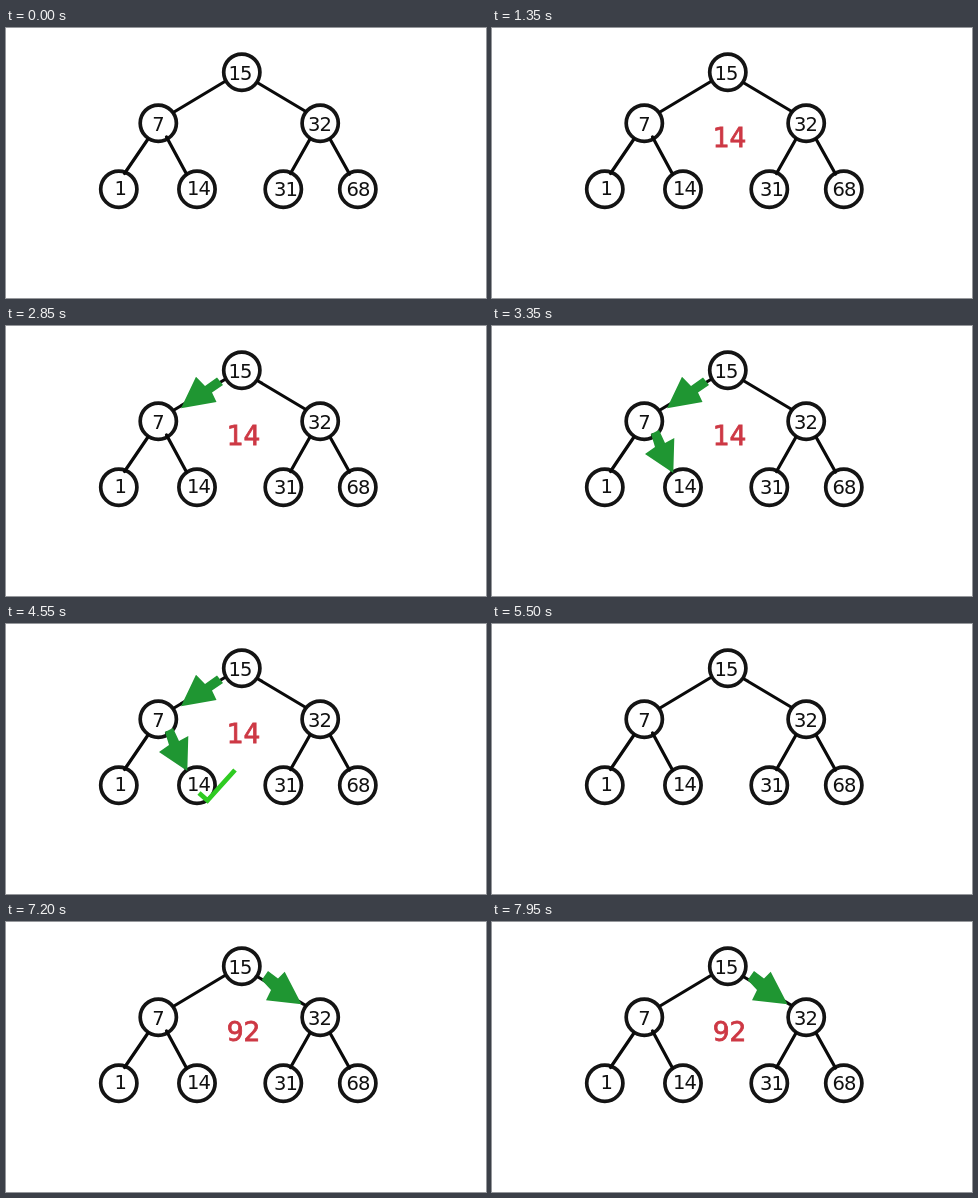
Animation, 480 px wide and 270 px high, one loop 8000 ms. Source, as an HTML page:

```html
<!DOCTYPE html>
<html lang="en">
<head>
<meta charset="utf-8">
<title>Binary search tree lookup</title>
<style>
  html, body { margin: 0; width: 100%; height: 100%; overflow: hidden; background: #fff; }
  svg { display: block; width: 100vw; height: 100vh; }
  text { font-family: "DejaVu Sans", sans-serif; text-anchor: middle; }
  .node { fill: #fff; stroke: #141414; stroke-width: 3.7; }
  .edge { stroke: #0a0a0a; stroke-width: 3.2; stroke-linecap: round; }
  .label { font-size: 19.5px; letter-spacing: -1px; fill: #111; }
  .query { font-size: 26.5px; fill: #cd3844; stroke: #cd3844; stroke-width: 0.8; }
  .arrow { fill: #1f9632; }
  .check { fill: none; stroke: #2fcb22; stroke-width: 4.8; }
</style>
</head>
<body>
<svg id="stage" viewBox="0 0 480 270"></svg>
<script>
const LOOP = 8000;
const stage = document.getElementById('stage');

function add(tag, attrs, text = '') {
  const el = document.createElementNS('http://www.w3.org/2000/svg', tag);
  for (const [key, value] of Object.entries(attrs)) el.setAttribute(key, value);
  el.textContent = text;
  stage.append(el);
  return el;
}

// label, centre x, centre y, text x, text baseline
const nodes = [
  ['15', 235.8, 44.2, 234, 52],
  ['7', 152.3, 95.2, 152, 103],
  ['32', 314.2, 95.2, 313.5, 103],
  ['1', 112.8, 161.2, 114.3, 167],
  ['14', 191, 161.2, 192.5, 167],
  ['31', 277.3, 161.2, 279.5, 168],
  ['68', 351.8, 161.2, 352, 168]
];

const edges = [
  'M218 54L168 84', 'M252 55L299 83',
  'M142 111L118.5 145.5', 'M160.5 109L180.5 146',
  'M304 111L284.5 145.5', 'M324 111L343.5 146'
];

for (const [, cx, cy] of nodes) add('circle', { class: 'node', cx, cy, r: 18.1 });
for (const d of edges) add('path', { class: 'edge', d });
for (const [label, , , x, y] of nodes) add('text', { class: 'label', x, y }, label);

const query = label => add('text', { class: 'query', x: 237.5, y: 118.5 }, label);
const arrow = points => add('polygon', { class: 'arrow', points });

const toLeft = '175,82.3 190,50.7 199,60 211,51.5 217,59 206,66.5 210.5,76';
const toInner = '181.3,147 153,128 163,121 159,108 167,104 173,117 182.3,112';
const toRight = '295.5,82.3 260,78.2 265,68 255.7,58 262,49 272,56.5 278.7,49.7';

// element, time shown, time hidden
const steps = [
  [query('14'), 1050, 5050],
  [arrow(toLeft), 2050, 5050],
  [arrow(toInner), 3050, 5050],
  [add('path', { class: 'check', d: 'M193 169L201.5 176.5L229 146' }), 4050, 5050],
  [query('92'), 6050, LOOP],
  [arrow(toRight), 7050, LOOP]
];

function draw() {
  const t = performance.now() % LOOP;
  for (const [el, from, to] of steps) {
    el.style.visibility = t >= from && t < to ? 'visible' : 'hidden';
  }
  requestAnimationFrame(draw);
}
draw();
</script>
</body>
</html>
```
